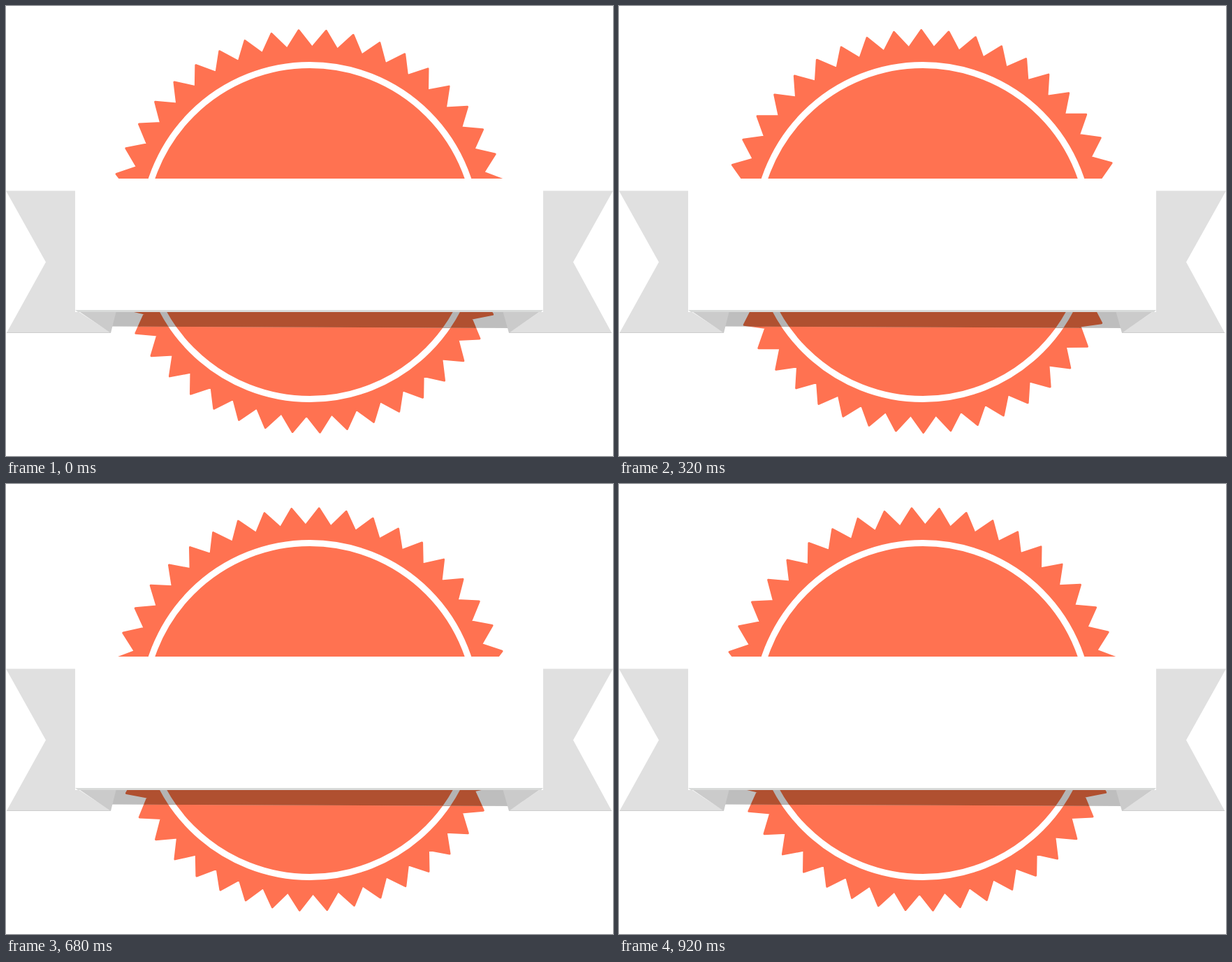
An HTML page that plays this animation: 869x644 px, repeating every 960 ms.

```html
<!DOCTYPE html>
<html lang="en">
<head>
<meta charset="utf-8">
<title>Badge with ribbon</title>
<style>
html, body { margin: 0; width: 100%; height: 100%; overflow: hidden; background: #fff; }
svg { display: block; width: 100%; height: 100%; }
</style>
</head>
<body>
<svg viewBox="0 0 869 644">
  <defs>
    <path id="star" fill="currentColor" stroke="currentColor" stroke-width="3" stroke-linejoin="round"/>
    <circle id="ring" cx="435" cy="323.5" r="239" fill="none" stroke-width="9"/>
    <clipPath id="shade"><path d="M140 436H730V461L140 458.5Z"/></clipPath>
  </defs>

  <use href="#star" color="#ff7251"/>
  <use href="#ring" stroke="#fff"/>

  <g clip-path="url(#shade)">
    <path d="M150 436H722V462H150Z" fill="#bebebe"/>
    <use href="#star" color="#b05030"/>
    <use href="#ring" stroke="#b4b4b4"/>
  </g>

  <g fill="#e0e0e0">
    <path d="M0 264.5H100V435L150 467.5H1L57 366.5Z"/>
    <path d="M869 264.5H768V435L720 467.5H867L812 366.5Z"/>
  </g>
  <path d="M1 467.5H150M720 467.5H867" stroke="#cdcdcd"/>
  <g fill="#cbcbcb">
    <path d="M103 436H158L150 468Z"/>
    <path d="M766 436H711L720 468Z"/>
  </g>
  <path d="M99 247H769V438H99Z" fill="#fff"/>
  <path d="M99 435H769L766 438H103Z" fill="#d8dad9"/>
</svg>
<script>
const TEETH = 46, STEPS = 23, STEP_MS = 40, LOOP = 960;
const CX = 434.25, CY = 322.5, TIP = 288, VALLEY = 263.2;
const pitch = 360 / TEETH;
const star = document.getElementById("star");

function point(radius, deg) {
  const a = deg * Math.PI / 180;
  return (CX + radius * Math.sin(a)).toFixed(2) + " " + (CY - radius * Math.cos(a)).toFixed(2);
}

const outline = [];
for (let i = 0; i < TEETH; i++) {
  outline.push(point(TIP, i * pitch), point(VALLEY, (i + 0.5) * pitch));
}
star.setAttribute("d", "M" + outline.join("L") + "Z");

// One loop turns the star by exactly one tooth, in even steps.
function draw(ms) {
  const step = Math.floor((ms % LOOP) / STEP_MS);
  const turn = -3.02 + pitch * step / STEPS;
  star.setAttribute("transform", `rotate(${turn} ${CX} ${CY})`);
}

let start;
function tick(now) {
  start ??= now;
  draw(Math.max(0, now - start));
  requestAnimationFrame(tick);
}
draw(0);
requestAnimationFrame(tick);
</script>
</body>
</html>
```
